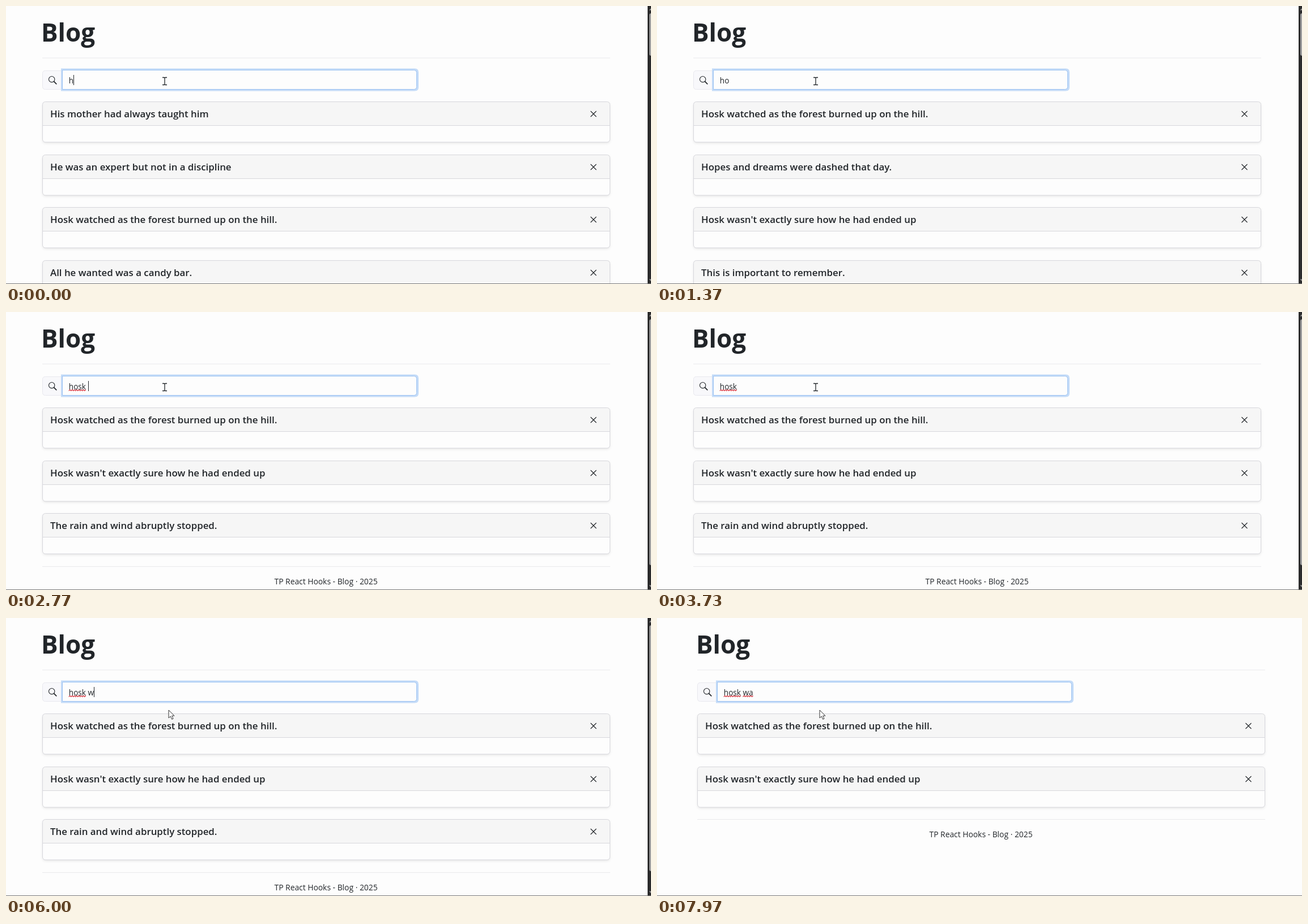
Animation, 1138 px wide and 492 px high, one loop 8000 ms. Source, as an HTML page:

```html
<!DOCTYPE html>
<html lang="en">
<head>
<meta charset="utf-8">
<title>Blog search</title>
<style>
  html, body { margin: 0; width: 100%; height: 100%; overflow: hidden; background: #fdfdfd; }
  svg { display: block; font-family: "Open Sans", "Noto Sans", sans-serif; fill: #212529; white-space: pre; }
  .h1 { font-weight: 700; font-size: 44px; }
  .title { font-weight: 600; font-size: 16.85px; }
  .foot { font-size: 13.85px; }
  .typed { font-size: 13.6px; }
  .card { filter: drop-shadow(0 2px 2px rgba(0, 0, 0, .09)); }
  .line { fill: none; stroke: #212529; }
</style>
</head>
<body>
<svg id="stage" width="1138" height="492" viewBox="0 0 1138 492"></svg>
<script>
const LOOP = 8000, BLINK = 530;
const stage = document.getElementById('stage');
const pen = document.createElement('canvas').getContext('2d');
pen.font = '13.6px "Open Sans", "Noto Sans", sans-serif';
const widthOf = s => pen.measureText(s).width;

const watched = 'Hosk watched as the forest burned up on the hill.';
const unsure = "Hosk wasn't exactly sure how he had ended up";

// [start time, value]; the last entry already reached applies
const typing = [
  [-200, 'h'], [350, 'ho'], [1500, 'hos'], [2450, 'hosk'],
  [2710, 'hosk '], [5900, 'hosk w'], [7130, 'hosk wa'], [7260, 'hosk wa ']
];
const results = [
  [0, ['His mother had always taught him', 'He was an expert but not in a discipline',
       watched, 'All he wanted was a candy bar.']],
  [1350, [watched, 'Hopes and dreams were dashed that day.', unsure, 'This is important to remember.']],
  [2560, [watched, unsure, 'The rain and wind abruptly stopped.']],
  [6740, [watched, unsure]]
];
const at = (list, t) => list.filter(e => e[0] <= t).pop();
const ramp = (t, a, b) => Math.min(1, Math.max(0, (t - a) / (b - a)));

const text = (cls, x, y, s) => `<text class="${cls}" x="${x}" y="${y}">${s}</text>`;
const path = (d, attrs) => `<path d="${d}" ${attrs}/>`;
const rule = y => path(`M64 ${y}H1066`, 'stroke="#e9e9ec"');
const slotTop = i => Math.round(169 + 93.6 * i) + .5;

function card(title, i) {
  const y = slotTop(i);
  return `<g class="card"><rect x="64.5" y="${y}" width="1001" height="71.5" rx="5" fill="#fdfdfd"/></g>` +
    path(`M64.5 ${y + 42}V${y + 5}q0-5 5-5H1060.5q5 0 5 5V${y + 42}z`, 'fill="#f6f6f6"') +
    path(`M64.5 ${y + 42}H1065.5`, 'stroke="#d7d7dc"') +
    `<rect x="64.5" y="${y}" width="1001" height="71.5" rx="5" fill="none" stroke="#d7d7dc"/>` +
    text('title', 78, y + 27.7, title) +
    path(`M1031.5 ${y + 16.5}l10 10m0-10l-10 10`, 'class="line" stroke-width="1.1"');
}

function squiggle(from, to) {
  let d = `M${from} 139.5`;
  for (let x = from, up = true; x + 2 <= to; x += 2, up = !up) d += `l2 ${up ? -2 : 2}`;
  return path(d, 'fill="none" stroke="#d5303a" stroke-width="1.1"');
}

function searchBox(t) {
  const [since, value] = at(typing, t), x = 110.8;
  let out =
    path('M98 114.5H69.5q-5 0-5 5V142.5q0 5 5 5H98z', 'fill="#f8f8fb" stroke="#e8e8ee"') +
    path('M97 110.5H721q7 0 7 7V143.5q0 7-7 7H97z', 'fill="#c5dcf8"') +
    path('M99.5 113.5H719.5q5 0 5 5V142.5q0 5-5 5H99.5z', 'fill="#fdfdfd" stroke="#98c0f2"') +
    '<circle class="line" cx="80.7" cy="129.7" r="5.2" stroke-width="1.1"/>' +
    path('M84.6 133.6l4.2 4.2', 'class="line" stroke-width="1.7" stroke-linecap="round"') +
    text('typed', x, 136.5, value);
  // a word is marked once a space follows it
  for (const m of value.matchAll(/\S+(?= )/g)) {
    const start = x + widthOf(value.slice(0, m.index));
    out += squiggle(start, start + widthOf(m[0]));
  }
  if (Math.floor((t - since) / BLINK) % 2 === 0) {
    const caret = Math.round(x + widthOf(value)) + .5;
    out += path(`M${caret} 122V140`, 'class="line"');
  }
  return out;
}

function scrollbar(thumbEnd) {
  return '<rect x="1132" width="6" height="492" fill="#2b2b2c"/>' +
    `<rect x="1135" y="13" width="8" height="${thumbEnd - 13}" rx="3" fill="#9c9c9c"/>` +
    path('M1134.5 7.5l4-4v4zM1134.5 483.5h4v4z', 'fill="#9c9c9c"');
}

function pointer(t) {
  const nudge = ramp(t, 4720, 4840), leave = ramp(t, 4900, 5300);
  const x = 280 + 7 * leave, y = 133 + 3 * nudge + 27 * leave;
  if (y < 151) {
    const beam = `M${x - 4} ${y - 6.5}h3q1 0 1 1v11q0 1-1 1h-3m8 0h-3q-1 0-1-1v-11q0-1 1-1h3`;
    return path(beam, 'fill="none" stroke="#fff" stroke-width="3"') +
      path(beam, 'class="line" stroke-width="1.3"');
  }
  return path(`M${x} ${y}v14l3.3-3 2.3 5.2 2.4-1-2.3-5.1h4.3z`, 'fill="#fff" stroke="#333" stroke-width="1"');
}

function scene(t) {
  const posts = at(results, t)[1], count = posts.length;
  let page = text('h1', 62, 63, 'Blog') + rule(92) + searchBox(t) + posts.map(card).join('');
  if (count < 4) {
    const y = slotTop(count);
    page += rule(y) + text('foot', 473.5, y + 31.5, 'TP React Hooks - Blog · 2025');
  }
  const fits = count < 3;
  return `<g transform="translate(${fits ? 7 : 0})">${page}</g>` +
    (fits ? '' : scrollbar(count < 4 ? 448 : 88)) +
    '<rect y="491" width="1138" height="1" fill="#777"/>' + pointer(t);
}

let shown = '';
const begin = performance.now();
function draw() {
  const next = scene((performance.now() - begin) % LOOP);
  if (next !== shown) stage.innerHTML = shown = next;
  requestAnimationFrame(draw);
}
draw();
</script>
</body>
</html>
```
